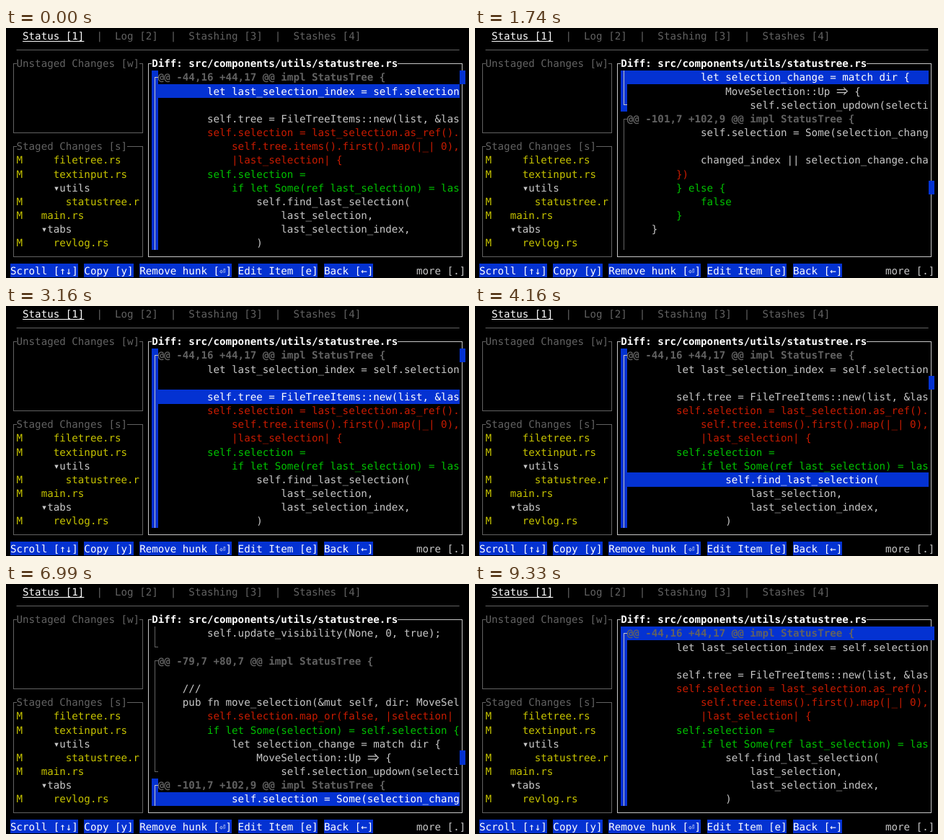
These frames come from a looping animation (642x347 px, 9.43 s). An HTML page with a canvas:

```html
<!DOCTYPE html>
<html lang="en">
<head>
<meta charset="utf-8">
<title>Terminal diff view</title>
<style>
  html, body { margin: 0; width: 100%; height: 100%; overflow: hidden; background: #000; }
  canvas { display: block; }
</style>
</head>
<body>
<canvas id="screen" width="642" height="347"></canvas>
<script>
const ctx = document.getElementById('screen').getContext('2d');
ctx.textRendering = 'geometricPrecision';

const LOOP = 9430;
const CW = 8.53, CH = 19.17, LEFT = 6, TOP = 1.4;   // terminal cell grid
const FONT = '14.17px "DejaVu Sans Mono", monospace';
const BLUE = '#0432d2', GREY = '#626262', FG = '#c7c7c7', WHITE = '#ffffff';
const YELLOW = '#c7c400', RED = '#c91b00', GREEN = '#00c200';
const ROWS = 13, FIRST_ROW = 3, TEXT_COL = 24, EDGE_COL = 73;

// First character: '@' hunk header, '-' removed, '+' added, ' ' context.
const DIFF = `@@ -44,16 +44,17 @@ impl StatusTree {
         let last_selection_index = self.selection
 
         self.tree = FileTreeItems::new(list, &las
-        self.selection = last_selection.as_ref().
-            self.tree.items().first().map(|_| 0),
-            |last_selection| {
+        self.selection =
+            if let Some(ref last_selection) = las
                 self.find_last_selection(
                     last_selection,
                     last_selection_index,
                 )
                 .or_else(|| self.tree.items().fir
-            },
-        );
+            } else {
+                // simply select first
+                self.tree.items().first().map(|_|
+            };
 
         self.update_visibility(None, 0, true);
 
@@ -79,7 +80,7 @@ impl StatusTree {
 
     ///
     pub fn move_selection(&mut self, dir: MoveSel
-        self.selection.map_or(false, |selection|
+        if let Some(selection) = self.selection {
             let selection_change = match dir {
                 MoveSelection::Up => {
                     self.selection_updown(selecti
@@ -101,7 +102,9 @@ impl StatusTree {
             self.selection = Some(selection_chang
 
             changed_index || selection_change.cha
-        })
+        } else {
+            false
+        }
     }
 
     ///`.split('\n').map(s => ({ kind: s[0] || ' ', text: s[0] === '@' ? s : s.slice(1) }));

const LAST = DIFF.length - 1;
let hunk = -1;
DIFF.forEach((line, i) => {
  line.start = line.kind === '@';
  if (line.start) hunk++;
  line.hunk = hunk;
  line.end = i === LAST || DIFF[i + 1].kind === '@';
});

// Cursor timeline: [time, selected line]
const moves = [[0, 1]];
const press = (sel, ...times) => times.forEach((t, i) => moves.push([t, sel + i]));
function hold(t, count, from, to) {
  for (let i = 0; i < count; i++) {
    const time = Math.floor((t + i * 83.4) / 10) * 10;
    moves.push([time, Math.round(from + (to - from) * i / (count - 1))]);
  }
}
hold(83, 9, 5, LAST);
press(41, 1410);
hold(1580, 8, 40, 0);
press(1, 2750, 3000, 3160, 3250, 3410, 3580, 3750);
press(8, 3910, 4080, 4250, 4410, 4580, 4660, 4830);
press(15, 4990, 5160, 5330, 5410);
press(19, 5910, 6080, 6240);
press(33, 6990);
press(LAST, 7580);
press(41, 8410);
hold(8580, 10, 40, 0);

let scroll = 0;
const states = moves.map(([t, sel]) => {
  scroll = Math.min(sel, Math.max(scroll, sel - ROWS + 1));
  return { t, sel, scroll };
});

const colX = c => LEFT + c * CW;
const rowY = r => TOP + r * CH;
const midX = c => Math.floor(colX(c + 0.5));
const midY = r => Math.floor(rowY(r + 0.5));

function fill(x0, y0, x1, y1, color) {
  ctx.fillStyle = color;
  ctx.fillRect(x0, y0, x1 - x0, y1 - y0);
}

function cells(col, row, count, color) {
  fill(Math.round(colX(col)), Math.round(rowY(row)),
       Math.round(colX(col + count)), Math.round(rowY(row + 1)), color);
}

function wideArrow(x, y, color) {
  ctx.strokeStyle = color;
  ctx.lineWidth = 1.2;
  ctx.beginPath();
  ctx.moveTo(x + 1, y - 2);
  ctx.lineTo(x + 13, y - 2);
  ctx.moveTo(x + 1, y + 2);
  ctx.lineTo(x + 13, y + 2);
  ctx.moveTo(x + 10.5, y - 5);
  ctx.lineTo(x + 15.5, y);
  ctx.lineTo(x + 10.5, y + 5);
  ctx.stroke();
}

function print(text, col, row, color, bold) {
  ctx.font = (bold ? 'bold ' : '') + FONT;
  const y = rowY(row) + 14.5;
  for (let i = 0; i < text.length; i++) {
    if (text.startsWith('=>', i)) {
      wideArrow(colX(col + i), rowY(row + 0.5), color);
      i++;
    } else if (text[i] !== ' ') {
      ctx.fillStyle = color;
      ctx.fillText(text[i], colX(col + i), y);
    }
  }
}

function panel(title, c0, r0, c1, r1, color, titleColor, bold) {
  ctx.strokeStyle = color;
  ctx.lineWidth = 1;
  ctx.strokeRect(midX(c0) + 0.5, midY(r0) + 0.5, midX(c1) - midX(c0), midY(r1) - midY(r0));
  cells(c0 + 1, r0, title.length, '#000');
  print(title, c0 + 1, r0, titleColor, bold);
}

function drawTabs() {
  print('Status [1]', 2, 0, WHITE);
  fill(colX(2), 18, colX(12), 19, WHITE);
  print('|  Log [2]  |  Stashing [3]  |  Stashes [4]', 14, 0, GREY);
  fill(colX(1), midY(1), colX(73), midY(1) + 1, GREY);
}

function drawFiles() {
  panel('Unstaged Changes [w]', 0, 2, 21, 7, GREY, GREY);
  panel('Staged Changes [s]', 0, 8, 21, 16, GREY, GREY);
  [['filetree.rs', 7], ['textinput.rs', 7], ['▾utils', 7], ['statustree.r', 9],
   ['main.rs', 5], ['▾tabs', 5], ['revlog.rs', 7]].forEach(([name, col], i) => {
    const folder = name[0] === '▾';
    if (!folder) print('M', 1, 9 + i, YELLOW);
    print(name, col, 9 + i, folder ? FG : YELLOW);
  });
}

function drawMarker(line, row, active) {
  if (active) cells(23, row, 1, BLUE);
  const color = active ? FG : GREY, x = midX(23), y = midY(row);
  fill(x, line.start ? y : Math.round(rowY(row)), x + 1,
       line.end ? y + 1 : Math.round(rowY(row + 1)), color);
  if (line.start || line.end) fill(x, y, Math.round(colX(24)), y + 1, color);
}

function drawDiff({ sel, scroll }, activeHunk) {
  panel('Diff: src/components/utils/statustree.rs', 22, 2, EDGE_COL, 16, FG, WHITE, true);
  for (let i = 0; i < ROWS; i++) {
    const n = scroll + i, row = FIRST_ROW + i, line = DIFF[n];
    const selected = n === sel;
    drawMarker(line, row, line.hunk === activeHunk);
    if (selected) cells(TEXT_COL, row, EDGE_COL - TEXT_COL, BLUE);
    const color = { '@': GREY, '-': RED, '+': GREEN }[line.kind] || (selected ? WHITE : FG);
    print(line.text, TEXT_COL, row, color, line.start);
  }
  cells(EDGE_COL, FIRST_ROW + Math.floor(sel * (ROWS - 1) / LAST), 1, BLUE);
}

function drawCommands(canRemove) {
  [['Scroll [↑↓]', 0], ['Copy [y]', 12], ['Remove hunk [⏎]', 21],
   ['Edit Item [e]', 37], ['Back [←]', 51]].forEach(([label, col]) => {
    cells(col, 17, label.length, BLUE);
    print(label, col, 17, col === 21 && !canRemove ? GREY : WHITE);
  });
  print('more [.]', 66, 17, FG);
}

function draw(time) {
  const state = states.filter(s => s.t <= time).pop();
  // No hunk is active on the very last line.
  const activeHunk = state.sel === LAST ? -1 : DIFF[state.sel].hunk;
  fill(0, 0, 642, 347, '#000');
  drawTabs();
  drawFiles();
  drawDiff(state, activeHunk);
  drawCommands(activeHunk >= 0);
}

const begin = performance.now();
function tick() {
  draw((performance.now() - begin) % LOOP);
  requestAnimationFrame(tick);
}
tick();
</script>
</body>
</html>
```
